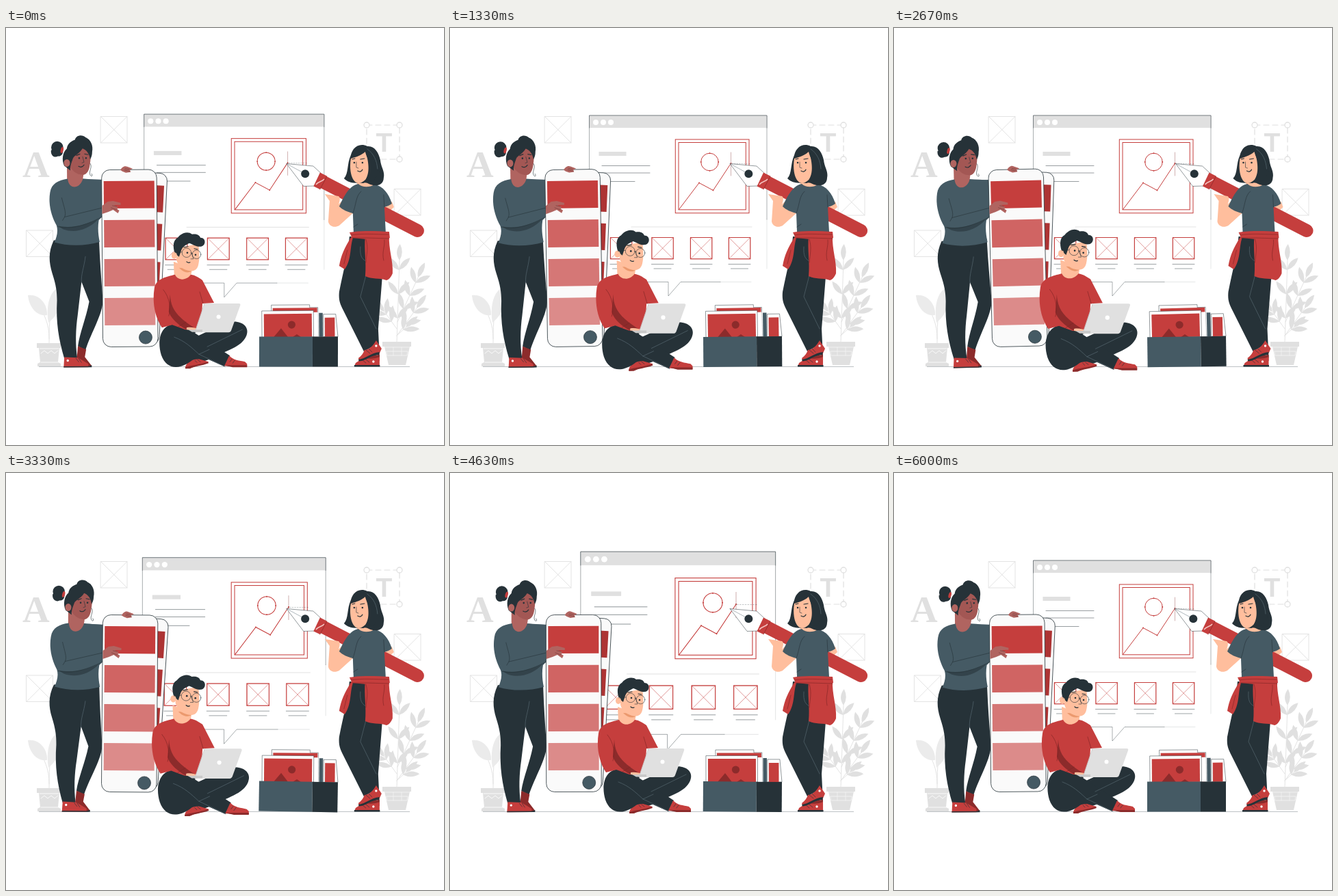
An HTML page for the animation above (6040 ms loop, 640 by 610 pixels).

```html
<!DOCTYPE html>
<html lang="en">
<head>
<meta charset="utf-8">
<title>Design team</title>
<style>
  html, body { margin: 0; width: 100%; height: 100%; overflow: hidden; background: #fff; }
  svg { display: block; width: 100vw; height: 100vh; }
  .red { fill: #c53e3d; } .dred { fill: #8c2b2b; }
  .ink { fill: #263238; } .slate { fill: #455a64; }
  .grey { fill: #e0e0e0; } .pale { fill: #ebebeb; } .white { fill: #fff; }
  .skin { fill: #ffbe9d; } .brown { fill: #b06460; } .face { fill: #a35754; }
  .fine, .soft, .redline, .greyline, .whiteline { fill: none; stroke-linecap: round; }
  .fine { stroke: #263238; stroke-width: .6; }
  .soft { stroke: #5d6f78; stroke-width: .6; }
  .redline { stroke: #c53e3d; stroke-width: 1; }
  .greyline { stroke: #e0e0e0; stroke-width: .9; }
  .whiteline { stroke: #fff; stroke-width: .8; }
  .thin { stroke-width: .5; } .bold { stroke-width: 1.2; }
  .maroon { stroke: #7d2424; } .umber { stroke: #6f3836; }
</style>
</head>
<body>
<svg viewBox="0 0 640 610" preserveAspectRatio="xMidYMid meet">
  <g id="backdrop">
    <text x="24" y="218" font-size="55" font-weight="700" class="grey" font-family="Liberation Serif, serif">A</text>
    <text x="540.5" y="181" font-size="39" font-weight="700" class="grey" font-family="Liberation Sans, sans-serif">T</text>
    <rect x="527" y="142" width="48" height="50" class="greyline bold" stroke-dasharray="8 5"/>
    <g class="white" stroke="#e0e0e0" stroke-width="1.3">
      <circle cx="527" cy="142" r="4"/><circle cx="575" cy="142" r="4"/><circle cx="575" cy="192" r="4"/><circle cx="527" cy="192" r="4"/>
    </g>
    <path class="greyline" d="M63 462C64 440 60 425 48 406M63 455C63 430 65 410 71 392"/>
    <path class="pale" d="M60 420C45 422 34 409 32 391C48 389 61 403 60 420ZM62 431C58 406 64 386 76 380C84 398 78 419 62 431Z"/>
    <path class="grey" d="M45 461H80V468H78L76 489L80 491V495H46V491L50 489L48 468H45Z"/>
    <path class="whiteline" d="M49 469H77M51 476L56 472L61 476L66 472L71 476L76 472M51 489H76"/>
    <g id="fronds" class="grey"></g>
    <path class="grey" d="M550 459H592V466H590L584 493H559L553 466H550Z"/>
    <path class="whiteline thin" d="M554 467H589M556 473H587L586 479H557ZM566 467V479M578 467V479"/>
    <path d="M48 495.4H590" stroke="#a9aeb1" stroke-width=".8"/>
  </g>

  <g id="window">
    <path class="white" d="M203.5 128H463V371.5H337L319 392V371.5H203.5Z"/>
    <path class="fine" stroke-opacity=".65" d="M203.5 371V128H463V280"/>
    <path class="fine" stroke-opacity=".2" d="M463 280V352M395 371.5H440"/>
    <path class="fine" stroke-opacity=".65" d="M285 371.5H319V392L337 371.5H395"/>
    <rect x="203.5" y="128" width="259.5" height="18" class="grey"/>
    <path class="fine" stroke-opacity=".8" d="M203.5 146V128H463V146"/>
    <g class="white"><circle cx="213" cy="138" r="4"/><circle cx="224" cy="138" r="4"/><circle cx="235" cy="138" r="4"/></g>
    <rect x="217.5" y="181" width="40" height="6" class="grey"/>
    <path class="fine" stroke-opacity=".8" d="M222 201.5H292M222 212H292M222 224.5H270"/>
    <path class="greyline" d="M265 291H441"/>
    <rect x="329.3" y="163" width="107.7" height="107.7" class="redline"/>
    <rect x="334" y="167.5" width="98.3" height="98.3" class="redline"/>
    <circle cx="379.5" cy="196" r="12.8" class="redline"/>
    <path class="redline" d="M334.5 265.5L364 226.5L384.5 237.5L410.5 198"/>
    <g class="red" id="anchors"></g>
    <path class="fine maroon thin" stroke-opacity=".7" d="M410.5 182V216"/>
    <path class="fine thin" stroke-opacity=".5" stroke-dasharray="1.5 2" d="M412 198.5H440"/>
    <g id="icons"></g>
  </g>

  <g id="presenter">
    <path class="slate" d="M112 220C125 221 135 222 146 222V270H120Z"/>
    <path class="ink" d="M70 310C61 328 63 343 67 357C73 376 74 385 74 398C72 430 76 455 84 483H103C100 462 101 440 104 420L110 371L121 400C116 425 107 445 104 465L115 471C124 444 141 418 141 398C139 370 137 340 136 308Z"/>
    <path class="soft" d="M116 334C114 350 109 360 110 372"/>
    <path class="dred" d="M104 465L116 470L114 481L124 494L120 496L102 486Z"/>
    <path class="red" d="M84 481L104 482L119 491L119 496H83Z"/>
    <path class="ink" d="M83 494.5H120L124 493L124 496H83Z"/>
    <circle cx="89" cy="486" r="1.7" class="white"/>
    <path class="fine" d="M101 483L105 488M105 483L109 489"/>
    <path class="brown" d="M90 196L115 208L112 228C107 237 92 234 90 223Z"/>
    <path class="slate" d="M91 220C77 222 67 227 65 240C62 258 67 275 74 288C77 297 74 305 71 313C90 319 116 319 137 313C135 303 134 292 136 281L143 274V222L113 221C108 236 92 236 91 220Z"/>
    <path class="fine" d="M82 248C85 261 89 270 86 276L145 262M76 290C92 294 112 291 141 276M86 276L83 281"/>
    <path class="ink" opacity=".55" d="M76 289C95 293 115 289 136 279C120 296 100 300 84 294Z"/>
    <g transform="rotate(3.3 202 453)">
      <rect x="145" y="212" width="78" height="250" rx="11" fill="#fafafa" stroke="#263238" stroke-width=".8"/>
      <path fill="#ad3434" d="M160 230H219V269H160ZM160 286H219V325H160ZM160 342H219V381H160Z"/>
    </g>
    <rect x="140.5" y="207.5" width="80.5" height="259" rx="12" fill="#fafafa" stroke="#263238" stroke-width=".8"/>
    <g id="swatches"></g>
    <circle cx="203" cy="453" r="9.5" class="slate" stroke="#263238" stroke-width=".7"/>
    <path class="brown" d="M168 208C170 204 174 201 178 203L186 206L182 208L183 211L176 212L171 210Z"/>
    <path class="soft umber" d="M175 206L181 207M174 208L182 210"/>
    <path class="brown" d="M141 260L149 254L157 253L168 256V259L158 259L164 262L163 265L166 267L164 271L157 266L150 269L141 272Z"/>
    <path class="soft umber" d="M156 260L162 261M154 263L162 266"/>
    <circle cx="76" cy="174" r="8.8" class="ink"/>
    <path class="ink" d="M67 178C66 186 72 190 77 187C84 188 86 180 83 174Z"/>
    <path class="face" d="M95 180L122 172C126 182 125 192 123 203C121 212 116 216 110 214C101 213 94 204 92 196Z"/>
    <path class="ink" d="M86 201C82 192 84 181 90 176C91 168 97 165 102 163C104 156 113 155 118 160C125 163 129 172 127 181C127 187 125 190 124 192C123 184 119 178 113 176C108 184 101 186 99 190C97 196 94 202 95 208Z"/>
    <ellipse cx="90" cy="197" rx="4.5" ry="5.5" class="brown"/>
    <ellipse cx="83" cy="178" rx="2" ry="4.5" class="red" transform="rotate(15 83 178)"/>
    <path class="fine bold" d="M104 186L109 184M116 184L121 185M107 202C110 204 113 203 115 200"/>
    <path class="fine" d="M113 188L115 196L112 197M124 198C128 203 121 210 124 215C126 218 128 216 126 213M119 161L123 165M122 163L122 169"/>
    <circle cx="108" cy="190" r="1.3" class="ink"/><circle cx="118" cy="190" r="1.3" class="ink"/>
  </g>

  <g id="coder">
    <path class="ink" d="M322 431C342 425 357 436 351 450C344 467 322 471 298 484L268 495L270 455Z"/>
    <path class="red" d="M262 496C264 488 272 484 282 484L296 488C290 493 278 493 270 497L263 498Z"/>
    <path class="dred" d="M262 496C270 493 285 492 295 488L296 490C286 494 276 494 269 498H262Z"/>
    <path class="ink" d="M244 433C225 437 221 458 227 478C233 495 246 499 260 493C268 490 274 484 281 478L319 495L327 479L276 446L285 440Z"/>
    <path class="soft" d="M246 452C262 458 271 467 282 477L320 495M294 466L345 441M282 477L297 470"/>
    <path class="red" d="M326 479C332 486 341 486 349 488L352 491V495H331L319 494Z"/>
    <path class="dred" d="M319 493L352 493V496H331Z"/>
    <path class="fine" d="M330 484L327 488M334 486L331 490M276 486L279 489M280 485L284 488"/>
    <path class="skin" d="M245 342L272 352L270 365C264 372 250 370 246 364Z"/>
    <path fill="#eb996e" d="M253 351C260 358 266 359 271 356L271 352Z"/>
    <path class="red" d="M247 361C235 364 219 367 217 381C214 400 217 422 228 438L243 434L262 441L285 440L287 403L304 402L287 369C281 365 277 362 270 361C264 370 251 370 247 361Z"/>
    <path class="dred" d="M240 390C241 409 247 421 278 440H262C253 435 241 425 238 415Z"/>
    <path class="fine maroon" d="M230 383C240 395 241 411 238 421M283 386L288 403M252 437L263 430"/>
    <path class="skin" d="M264 438C270 437 276 438 283 441L280 443L264 441Z"/>
    <path class="grey" d="M290 403H340Q343 403 342 406L329 442Q328 445 325 445H276Z"/>
    <path fill="#c9c9c9" d="M266 441H287V444.5H272Z"/>
    <path d="M276 444.5L290 403" stroke="#c7c7c7" stroke-width=".8"/>
    <circle cx="310.5" cy="422.5" r="3" class="white"/>
    <path class="skin" d="M250 322L281 316C283 328 283 338 281 347C279 355 273 357 266 355C257 353 251 347 249 339Z"/>
    <path class="ink" d="M247 330C243 319 245 310 251 307C256 300 266 297 272 302C280 301 283 304 284 307C293 307 292 319 285 320C278 321 272 316 268 315C262 318 258 320 256 326L253 335Z"/>
    <ellipse cx="246" cy="333" rx="4" ry="5" class="skin"/>
    <g class="fine"><circle cx="264" cy="329" r="6.7"/><circle cx="278.5" cy="331.5" r="6.3"/>
      <path d="M270.7 330H272.3M257 328L247 329M271 329L274 338L270 338"/></g>
    <path class="fine bold" d="M260 321L266 320M275 323L280 324M264 342C265 343 267 344 269 343"/>
    <circle cx="265" cy="329" r="1.3" class="ink"/><circle cx="277" cy="332" r="1.3" class="ink"/>
  </g>

  <g id="crate">
    <g transform="rotate(-.5 427 450)" stroke-width=".5">
      <path class="white" stroke="#263238" d="M388 452V405L444 405V409H456V452Z"/>
      <path class="red" d="M390 409.5H455V452H390Z"/>
      <path class="white" d="M448 416H456V452H448Z"/>
      <path class="white" stroke="#263238" d="M464 452V419H482L485 452Z"/>
      <path class="slate" d="M457.5 417H463V452H457.5Z"/>
      <path class="red" d="M466 424H480.5V452H466Z"/>
      <path class="white" stroke="#263238" d="M374 452V413.5H449.5V452Z"/>
      <path class="red" d="M377 418H447V452H377Z"/>
      <path class="dred" d="M391 452L402 439L412 452ZM419 452L425 448L431 452Z"/>
      <circle cx="417.5" cy="434" r="5.6" class="dred"/>
    </g>
    <path class="slate" d="M370 451.5H448V495.5H370Z"/>
    <path class="ink" d="M448 451.5H485V495.5H448Z"/>
  </g>

  <g id="artist">
    <path class="skin" d="M555 256L564 254L567 262L556 272Z"/>
    <path d="M464 225.5L601.5 296.5" stroke="#c53e3d" stroke-width="19" stroke-linecap="round"/>
    <path class="white" stroke="#263238" stroke-width=".5" d="M410 198.5L449 202L461 213L452 231L435 231.5Z"/>
    <path class="soft thin" d="M410 198.5L433 211"/>
    <circle cx="437.3" cy="213.2" r="6" class="ink"/>
    <path class="red" d="M459 211.5L469 216.5L459 236L449.5 231.5Z"/>
    <path class="fine maroon" d="M469 217L459 236"/>
    <path fill="none" stroke="#f2c3c0" stroke-width="1.6" d="M453 229C457 224 462 225 465 221"/>
    <path class="skin" d="M466 243L486 246C489 248 488 253 486 258L490 254L508 270L487 289C480 293 472 290 471 283L473 253Z"/>
    <path class="ink" d="M502 305C500 332 493 355 487 386C486 398 488 403 493 413L523 473L543 462L544 482H546L544 440L550 363L548 306Z"/>
    <path class="soft" d="M526 362L518 393L541 440M518 320C517 333 520 338 526 341"/>
    <path class="dred" d="M520 481L546 478V487H516Z"/>
    <path class="red" d="M541 457L549 469L545 478C535 478 526 487 516 487L515 483C520 479 522 476 524 471C532 470 537 464 541 457Z"/>
    <path class="red" d="M523 482C531 485 540 484 546 481V495H509L511 490Z"/>
    <path class="ink" d="M509 493H546.500V495.500H509ZM515 485C526 484 533 475 546 474L545 478C535 478 526 487 516 487.500Z"/>
    <path class="fine" d="M526 471L532 476M530 469L535 474M520 485L526 490M525 484L531 489"/>
    <circle cx="541" cy="465" r="1.7" class="white"/><circle cx="537" cy="488" r="1.7" class="white"/>
    <path class="skin" d="M513 218H530L540 233C531 238 518 237 513 231Z"/>
    <path class="slate" d="M515 228C503 230 495 243 487 261C492 266 499 269 507 271L508 299H555L553 262C557 261 561 259 564 257C560 243 551 231 539 229C532 233 521 234 515 228Z"/>
    <path class="fine" d="M519 239C511 246 512 258 507 271M552 244L553 262M508 291L514 287"/>
    <path class="red" d="M502 299C520 296 542 297 560 298L561 307L527 309L506 307Z"/>
    <path class="red" d="M508 305C502 318 506 338 495 353L487 348C490 332 494 323 505 305Z"/>
    <path class="red" d="M525 304H560C559 324 566 340 565 359C563 364 560 368 556 369C545 365 535 368 525 363C527 342 523 325 525 304Z"/>
    <path class="fine maroon" d="M504 303C520 300 540 302 559 302M506 307H527L560 308M526 309C530 322 527 330 526 343M553 310C554 321 549 327 552 340M499 325L494 345"/>
    <path class="ink" d="M504 186C507 173 518 168 528 173C539 172 545 183 547 193C548 204 554 209 552 219C552 227 546 231 539 230C531 230 527 224 522 227C515 226 502 229 494 220C501 213 498 199 504 186Z"/>
    <path class="skin" d="M504 191C511 189 520 186 525 181C527 190 533 196 531 207C531 219 522 227 515 227C506 226 501 210 504 191Z"/>
    <path class="ink" d="M525 178C535 184 541 198 546 211L537 224L526 221C533 209 529 192 525 178Z"/>
    <path class="soft" d="M528 177C538 184 542 194 543 206"/>
    <path class="fine bold" d="M506 192L510 191M518 192L524 191M514 209C517 211 520 210 521 207"/>
    <path class="fine" d="M512 196L512 204L515 205"/>
    <circle cx="509" cy="197" r="1.3" class="ink"/><circle cx="521" cy="197" r="1.3" class="ink"/>
  </g>
</svg>
<script>
const el = id => document.getElementById(id);
const fill = (id, parts) => { el(id).innerHTML = parts.join(''); };

// Static repeated parts
const crossBox = (x, y, size) =>
  `M${x} ${y}h${size}v${size}h${-size}zl${size} ${size}m${-size} 0l${size} ${-size}`;

el('backdrop').insertAdjacentHTML('afterbegin',
  [[138.5, 129.5], [30, 296], [567.5, 235.5]]
    .map(([x, y]) => `<path class="greyline" d="${crossBox(x, y, 38.5)}"/>`).join(''));

fill('icons', [234.5, 295, 351.5, 407.5].map(x =>
  `<path class="redline thin" d="${crossBox(x, 306.5, 31.3)}"/>
   <rect class="redline" x="${x}" y="306.5" width="31.3" height="31.3"/>
   <path class="fine" stroke-opacity=".75" d="M${x - 0.5} 345.5h32M${x + 3} 352h25"/>`));

fill('anchors', [[364, 226.5], [384.5, 237.5], [410.5, 198], [366.7, 196], [392.3, 196], [379.5, 183.2], [379.5, 208.8]]
  .map(([x, y]) => `<circle cx="${x}" cy="${y}" r=".9"/>`));

fill('swatches', ['#c53e3d', '#d06463', '#d57776', '#dc8b8a'].map((color, i) =>
  `<rect x="143.5" y="${224 + 57 * i}" width="74" height="40" fill="${color}"/>`));

const leaf = (x, y, angle, length) =>
  `<path transform="translate(${x} ${y}) rotate(${angle})" d="M0 0Q${length / 2} ${-length * 0.36} ${length} 0Q${length / 2} ${length * 0.28} 0 0Z"/>`;

function frond(x0, y0, x1, y1, pairs) {
  const angle = Math.atan2(y1 - y0, x1 - x0) * 180 / Math.PI;
  let out = `<path class="greyline" d="M${x0} ${y0}L${x1} ${y1}"/>` + leaf(x1, y1, angle, 24);
  for (let i = 1; i <= pairs; i++) {
    const k = i / (pairs + 0.4), x = x0 + (x1 - x0) * k, y = y0 + (y1 - y0) * k;
    out += leaf(x, y, angle - 40, 24) + leaf(x, y, angle + 40, 24);
  }
  return out;
}
fill('fronds', [
  frond(571, 460, 575, 340, 3), frond(572, 430, 602, 365, 3),
  frond(571, 450, 600, 410, 2), frond(571, 450, 584, 438, 1), frond(571, 440, 553, 415, 2),
]);

// Piecewise linear keyframes: [[position, value], ...]
function tween(keys, p) {
  const i = Math.max(1, keys.findIndex(([at]) => at >= p));
  const [a, u] = keys[i - 1], [b, v] = keys[i];
  return u + (v - u) * (p - a) / (b - a);
}
const heartbeat = [[0, 1], [.1, 1.1], [.3, 1], [.4, 1], [.5, 1.1], [.6, 1], [1, 1]];
const wind = [[0, 0], [.25, 1], [.75, -1], [1, 0]];
const shake = [[0, 0], [.1, -1], [.2, 2], [.3, -4], [.4, 4], [.5, -4], [.6, 4], [.7, -4], [.8, 2], [.9, -1], [1, 0]];

const move = (id, transform) => el(id).setAttribute('transform', transform);
const scaleAt = (x, y, s) => `translate(${x} ${y}) scale(${s}) translate(${-x} ${-y})`;

const LOOP = 6040, CYCLE = 6000, STEP = 1000 / 24;

function render(ms) {
  // The motion advances in steps of 24 per second
  const time = Math.min(CYCLE, (Math.floor((ms % LOOP + 5) / STEP) + 0.5) * STEP);
  const beat = time % 1500 / 1500;
  const sway = tween(wind, beat);
  move('window', scaleAt(333.25, 260, tween(heartbeat, beat)));
  move('coder', scaleAt(284, 398, tween(heartbeat, time / CYCLE)));
  move('presenter', `rotate(${sway - 0.5} 150 327)`);
  move('crate', `rotate(${sway} 428 450)`);
  move('artist', `translate(${tween(shake, beat)} 0)`);
}

const start = performance.now();
function tick() {
  render(performance.now() - start);
  requestAnimationFrame(tick);
}
tick();
</script>
</body>
</html>
```
